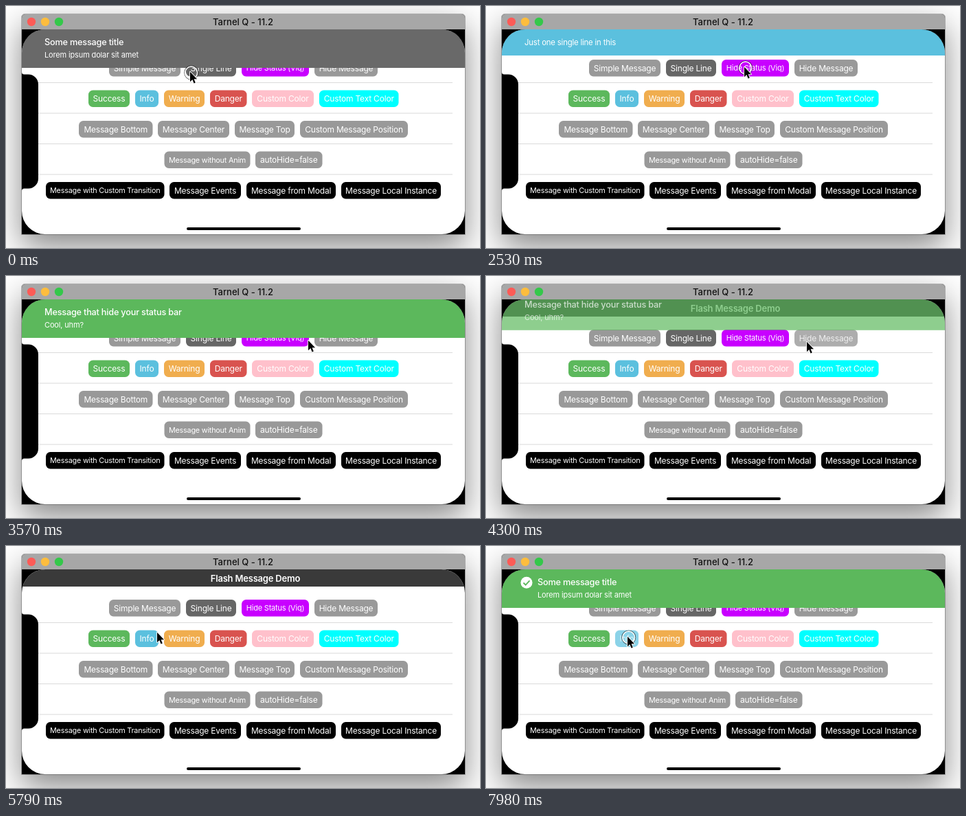
Recreate the animation shown at these times as an HTML page with a canvas. Size 690 by 352 pixels, loop 8 s.

```html
<!DOCTYPE html>
<html lang="en">
<head>
<meta charset="utf-8">
<title>Flash Message Demo</title>
<style>
html, body { margin: 0; width: 100%; height: 100%; overflow: hidden; background: #fff; }
canvas { display: block; width: 690px; height: 352px; }
</style>
</head>
<body>
<canvas id="stage" width="690" height="352"></canvas>
<script>
const ctx = document.getElementById('stage').getContext('2d');
const LOOP = 8000, STEP = 148, LEAD = 12;
const FONT = 'Inter, Roboto, "Liberation Sans", sans-serif';
const GREY = '#999', GREEN = '#5cb85c', BLUE = '#5bc0de';
const ROW_GAP = 44.5;

// label, left, width, colour, font size
const ROWS = [
  [['Simple Message', 150, 104, GREY], ['Single Line', 262, 73, '#666'],
   ['Hide Status (Viq)', 343, 98, '#c800ff', 11], ['Hide Message', 449, 92, GREY]],
  [['Success', 120, 60, GREEN], ['Info', 188, 34, BLUE], ['Warning', 230, 59, '#f0ad4e'],
   ['Danger', 297, 53.5, '#d9534f'], ['Custom Color', 358, 90, '#ffc0cb'],
   ['Custom Text Color', 456, 115.5, '#0ff']],
  [['Message Bottom', 106, 107.5, GREY], ['Message Center', 221, 104, GREY],
   ['Message Top', 333, 87, GREY], ['Custom Message Position', 428, 157, GREY]],
  [['Message without Anim', 230.5, 125, GREY, 10.8], ['autoHide=false', 363, 97.5, GREY]],
  [['Message with Custom Transition', 58, 172.5, '#000', 10.8], ['Message Events', 238, 104, '#000'],
   ['Message from Modal', 350, 130, '#000'], ['Message Local Instance', 488, 145, '#000']]
];

// step, x, y
const PATH = [
  [0, 268, 95], [3, 286, 95], [12, 286, 95], [16, 376, 88], [23, 376, 88],
  [24, 440, 93], [26, 467, 95], [37, 467, 95], [39, 220, 125], [40, 162, 134],
  [46, 162, 134], [50, 222, 136], [52, 206, 131], [54, 206, 131]
];

// first step, last step of the touch ring
const TOUCHES = [[0, 0], [6, 7], [17, 18], [27, 28], [34, 35], [41, 42], [53, 54]];

// first step, last step, label
const PRESSES = [[7, 8, 'Single Line'], [18, 19, 'Hide Status (Viq)'], [28, 29, 'Hide Message'],
  [35, 35, 'Hide Message'], [42, 43, 'Success'], [54, 54, 'Info']];

const BANNERS = [
  { from: 0, to: 7, color: '#696969', h: 56, title: 'Some message title', sub: 'Lorem ipsum dolar sit amet' },
  { from: 8, to: 18, enter: true, color: BLUE, h: 38, line: 'Just one single line in this' },
  { from: 19, to: 29, enter: true, leave: true, color: GREEN, h: 56,
    title: 'Message that hide your status bar', sub: 'Cool, uhm?' },
  { from: 43, to: 54, enter: true, color: GREEN, h: 56, icon: true,
    title: 'Some message title', sub: 'Lorem ipsum dolar sit amet' }
];

const during = n => ([from, to]) => n >= from && n <= to;

function box(x, y, w, h, r, color) {
  ctx.beginPath();
  ctx.roundRect(x, y, w, h, r);
  ctx.fillStyle = color;
  ctx.fill();
}

function dot(x, y, r, color) {
  ctx.beginPath();
  ctx.arc(x, y, r, 0, Math.PI * 2);
  ctx.fillStyle = color;
  ctx.fill();
}

function ring(x, y, r, width, color) {
  ctx.beginPath();
  ctx.arc(x, y, r, 0, Math.PI * 2);
  ctx.lineWidth = width;
  ctx.strokeStyle = color;
  ctx.stroke();
}

function text(str, x, y, size, { weight = 400, align = 'left', color = '#fff', gap = -0.2 } = {}) {
  ctx.font = `${weight} ${size}px ${FONT}`;
  ctx.letterSpacing = gap + 'px';
  ctx.textAlign = align;
  ctx.fillStyle = color;
  ctx.fillText(str, x, y + size * 0.36);
}

function drawWindow() {
  ctx.fillStyle = '#fff';
  ctx.fillRect(0, 0, 690, 352);
  ctx.save();
  ctx.shadowColor = 'rgba(0,0,0,.48)';
  ctx.shadowBlur = 48;
  ctx.shadowOffsetY = 18;
  box(23, 12, 645, 320, [5, 5, 0, 0], '#000');
  ctx.restore();
  ctx.beginPath();
  ctx.roundRect(22.5, 11.5, 646, 321, [5, 5, 0, 0]);
  ctx.lineWidth = 1;
  ctx.strokeStyle = 'rgba(0,0,0,.25)';
  ctx.stroke();
  box(23, 12, 645, 22, [5, 5, 0, 0], '#a7a7a7');
  ['#fc5b57', '#fdbd3e', '#34c84a'].forEach((c, i) => dot(37 + i * 20, 23, 6.2, c));
  text('Tarnel Q - 11.2', 345, 23, 13, { weight: 500, align: 'center', color: '#111', gap: 0 });
}

function drawChip([label, x, w, color, size = 12], cy, n) {
  const press = PRESSES.filter(during(n)).find(p => p[2] === label);
  if (press) ctx.globalAlpha = n === press[0] ? 0.7 : 0.8;
  box(x, cy - 12.25, w, 24.5, 6.5, color);
  text(label, x + w / 2, cy, size, { align: 'center' });
  ctx.globalAlpha = 1;
}

function drawNotch() {
  ctx.beginPath();
  ctx.moveTo(23, 96);
  ctx.arcTo(23, 99.5, 27, 99.5, 3.5);
  ctx.arcTo(47, 99.5, 47, 120, 14.5);
  ctx.arcTo(47, 265.5, 30, 265.5, 14.5);
  ctx.arcTo(23, 265.5, 23, 270, 3.5);
  ctx.lineTo(23, 269);
  ctx.fillStyle = '#000';
  ctx.fill();
}

function drawBanner(b, n) {
  let shift = 0, alpha = 1;
  if (b.enter && n === b.from) { shift = -0.69 * b.h; alpha = 0.31; }
  if (b.leave && n === b.to) { shift = -0.2 * b.h; alpha = 0.69; }
  ctx.save();
  ctx.translate(0, shift);
  ctx.globalAlpha = alpha;
  ctx.fillStyle = b.color;
  ctx.fillRect(23, 34, 645, b.h);
  const x = b.icon ? 75 : 56;
  if (b.line) text(b.line, x, 52.7, 11.4);
  else {
    text(b.title, x, 52.7, 12.7, { weight: 500 });
    text(b.sub, x, 71.5, 11, { gap: -0.15 });
  }
  if (b.icon) {
    dot(59, 53.3, 8.5, '#fff');
    ctx.beginPath();
    ctx.moveTo(54.5, 53.5);
    ctx.lineTo(57.7, 56.6);
    ctx.lineTo(63.5, 50.3);
    ctx.lineWidth = 1.8;
    ctx.strokeStyle = b.color;
    ctx.stroke();
  }
  ctx.restore();
}

function drawApp(n) {
  ctx.save();
  ctx.beginPath();
  ctx.roundRect(23, 34, 645, 298, 34);
  ctx.clip();
  ctx.fillStyle = '#fff';
  ctx.fillRect(23, 34, 645, 298);
  ctx.fillStyle = '#dadada';
  for (let i = 0; i < 4; i++) ctx.fillRect(41, 111 + i * ROW_GAP, 609, 1);
  ROWS.forEach((row, i) => row.forEach(chip => drawChip(chip, 90.25 + i * ROW_GAP, n)));
  ctx.fillStyle = '#3a3a3a';
  ctx.fillRect(23, 34, 645, 25);
  text('Flash Message Demo', 363, 47, 13, { weight: 600, align: 'center' });
  drawNotch();
  box(263, 322, 166, 4, 2, '#000');
  const banner = BANNERS.find(b => n >= b.from && n <= b.to);
  if (banner) drawBanner(banner, n);
  ctx.restore();
}

function pointerAt(n) {
  const i = Math.max(1, PATH.findIndex(p => p[0] >= n));
  const [a, x0, y0] = PATH[i - 1], [b, x1, y1] = PATH[i];
  const k = (n - a) / (b - a);
  return [x0 + (x1 - x0) * k, y0 + (y1 - y0) * k];
}

function drawPointer(n) {
  const [x, y] = pointerAt(n);
  if (TOUCHES.some(during(n))) {
    ring(x + 1.7, y + 2, 10, 1.1, 'rgba(0,0,0,.6)');
    ring(x + 1.7, y + 2, 8.9, 1.5, '#fff');
  }
  ctx.save();
  ctx.translate(x, y + 0.7);
  ctx.scale(0.95, 0.95);
  ctx.beginPath();
  [[0, 0], [0, 15.3], [3.5, 12], [5.9, 17.6], [8.2, 16.6], [5.9, 11.2], [10.6, 11.2]]
    .forEach(p => ctx.lineTo(...p));
  ctx.closePath();
  ctx.lineWidth = 1.8;
  ctx.lineJoin = 'round';
  ctx.strokeStyle = '#fff';
  ctx.stroke();
  ctx.fillStyle = '#000';
  ctx.fill();
  ctx.restore();
}

function render(now) {
  const n = Math.min(54, Math.floor((now % LOOP + LEAD) / STEP));
  drawWindow();
  drawApp(n);
  drawPointer(n);
}

const start = performance.now();
function tick() {
  render(performance.now() - start);
  requestAnimationFrame(tick);
}
tick();
</script>
</body>
</html>
```
